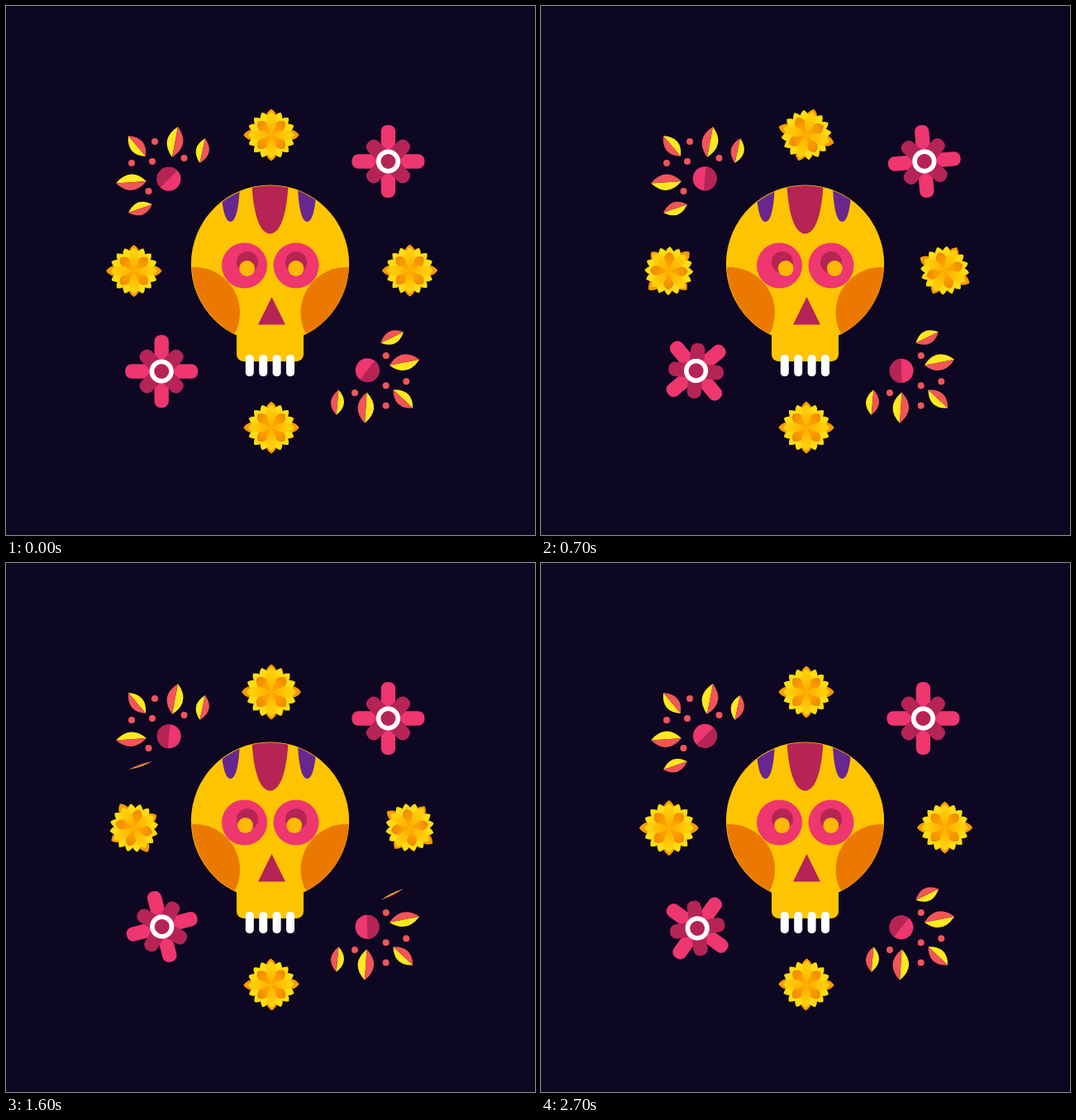
These frames come from a looping animation (640x640 px, 2800 ms). An HTML page:

```html
<!DOCTYPE html>
<html lang="en">
<head>
<meta charset="utf-8">
<title>Skull and flowers</title>
<style>
html, body { margin: 0; height: 100%; overflow: hidden; background: #0e0722; }
svg { display: block; width: 100vw; height: 100vh; }
</style>
</head>
<body>
<svg viewBox="0 0 640 640">
  <defs>
    <clipPath id="headClip"><circle cx="319.7" cy="312.2" r="95"/></clipPath>
    <radialGradient id="gold" gradientUnits="userSpaceOnUse" cx="0" cy="0" r="27">
      <stop offset=".2" stop-color="#ffb400"/><stop offset="1" stop-color="#ffd60e"/>
    </radialGradient>
    <radialGradient id="amber" gradientUnits="userSpaceOnUse" cx="0" cy="0" r="23">
      <stop offset=".3" stop-color="#fba400"/><stop offset="1" stop-color="#f08800"/>
    </radialGradient>
  </defs>
  <g id="garden"></g>
  <g id="skull">
    <circle cx="319.5" cy="312" r="95.6" fill="#ffc400"/>
    <rect x="279" y="370" width="81" height="60" rx="8.5" fill="#ffc400"/>
    <g clip-path="url(#headClip)">
      <g fill="#eb7900"><circle cx="228" cy="371" r="55"/><circle cx="411.5" cy="371" r="55"/></g>
      <path fill="#b52454" d="M297 205C298 248 306 275.5 319.5 275.5S341 248 342 205z"/>
      <g fill="#67278f">
        <path id="streak" d="M260 215C261 245 265 261 271.5 261S282 245 283 215z"/>
        <use href="#streak" transform="matrix(-1 0 0 1 635.8 0)"/>
      </g>
    </g>
    <g fill="#ee366f"><circle cx="288.5" cy="314" r="27.5"/><circle cx="351" cy="314" r="27.5"/></g>
    <g fill="#b52454">
      <circle cx="292" cy="310" r="13"/><circle cx="351" cy="310" r="13"/>
      <path d="M321.5 352L338 385.5H305z"/>
    </g>
    <g id="pupils" fill="#ffb900"><circle cy="317.5" r="9.4"/><circle cx="59.2" cy="317.5" r="9.4"/></g>
    <g id="teeth" fill="#fff"></g>
  </g>
</svg>
<script>
const LOOP = 2800;
const $ = id => document.getElementById(id);

function add(parent, tag, attrs = {}) {
  const node = document.createElementNS('http://www.w3.org/2000/svg', tag);
  for (const key in attrs) node.setAttribute(key, attrs[key]);
  return parent.appendChild(node);
}

// Progress from 0 to 1 between two times: steady, soft, or snappy
const linear = (t, start, end) => Math.min(1, Math.max(0, (t - start) / (end - start)));
const soft = (t, start, end) => (1 - Math.cos(Math.PI * linear(t, start, end))) / 2;
function snappy(t, start, end) {
  const u = linear(t, start, end);
  return u < .5 ? 4 * u ** 3 : 1 - 4 * (1 - u) ** 3;
}
const swell = (t, start) => 1 + .16 * (soft(t, start, start + 500) - soft(t, start + 500, start + 1500));

const parts = [];
const animate = (node, transform) => parts.push(t => node.setAttribute('transform', transform(t)));

// Flowers with rounded pink petals
function pinkFlower(x, y, dx, dy, start, end) {
  const flower = add($('garden'), 'g');
  const petals = (length, turn, fill) => {
    for (let i = 0; i < 4; i++)
      add(flower, 'rect', { x: -8.7, y: -length, width: 17.4, height: length, rx: 7.8, fill, transform: `rotate(${turn + i * 90})` });
  };
  petals(44, 0, '#ee366f');
  petals(33.5, 45, '#b52454');
  add(flower, 'circle', { r: 14.6, fill: '#fff' });
  add(flower, 'circle', { r: 9, fill: '#b52454' });
  animate(flower, t => `translate(${x} ${y}) rotate(${360 * linear(t, start, end)}) translate(${dx} ${dy})`);
}

// Layered golden flowers
function marigold(x, y, angle, scale = () => 1) {
  const flower = add($('garden'), 'g');
  const petal = (turn, length, width, fill) => add(flower, 'path', {
    d: `M0 0C${length * .5} ${-width} ${length * .82} ${-width} ${length} 0C${length * .82} ${width} ${length * .5} ${width} 0 0`,
    fill, transform: `rotate(${turn})`
  });
  for (let i = 0; i < 4; i++) petal(i * 90, i % 2 ? 31.5 : 33.7, 9, '#f79a00');
  for (let i = 0; i < 16; i++) if (i % 4) petal(i * 22.5, 29.5, 7.5, '#ffdc12');
  for (let i = 0; i < 4; i++) petal(i * 90 + 45, 23, 8.5, 'url(#amber)');
  for (let i = 0; i < 4; i++) petal(i * 90, 28, 8, 'url(#gold)');
  animate(flower, t => `translate(${x} ${y}) rotate(${angle(t)}) scale(${scale(t)})`);
}

// Sprays of two-toned leaves, dots and a turning disc
function spray(transform) {
  const group = add($('garden'), 'g', { transform });
  const leaves = [
    [234.5, 190, 241, 160], [133, 214.5, 170, 212], [177, 240, 148, 250],
    [169, 182, 148, 157], [201, 183, 208, 146]
  ];
  leaves.forEach(([x0, y0, x1, y1], i) => {
    const half = Math.hypot(x1 - x0, y1 - y0) / 2;
    const width = half * .52;
    // The lowest leaf is lit from its other side
    const lit = i === 2 ? 1 : -1;
    const turn = Math.atan2(y1 - y0, x1 - x0) * 180 / Math.PI;
    const node = add(group, 'g');
    for (const [side, fill] of [[lit, '#ffe81f'], [-lit, '#f25558']])
      add(node, 'path', { d: `M${-half} 0Q0 ${-side * lit * lit * -width * 2} ${half} 0z`, fill });
    const start = 60 + i * 80;
    const flip = t => soft(t, start, start + 280) - soft(t, start + 1250, start + 1530);
    animate(node, t => `translate(${(x0 + x1) / 2} ${(y0 + y1) / 2}) rotate(${turn}) scale(1 ${Math.cos(Math.PI * flip(t))})`);
  });
  for (const [cx, cy] of [[180, 164], [152, 190], [177, 188], [215.5, 184], [172.5, 224]])
    add(group, 'circle', { cx, cy, r: 4, fill: '#f25558' });
  const disc = add(group, 'g');
  add(disc, 'circle', { r: 14.5, fill: '#ee366f' });
  add(disc, 'path', { d: 'M10.25-10.25A14.5 14.5 0 0 0-10.25 10.25z', fill: '#b52454' });
  animate(disc, t => `translate(197.7 209.2) rotate(${t * .2}) translate(-.7 0)`);
}

spray('');
spray('translate(436.6 440.8) rotate(173) translate(-197.7 -209.2)');

pinkFlower(463.1, 188, -.7, 0, 100, 1335);
pinkFlower(188.6, 441, -.4, 1, 310, 3122);

marigold(321, 156, t => -180 * snappy(t, 200, 900), t => swell(t, 550));
marigold(488.5, 320, t => -180 * (snappy(t, 250, 930) + snappy(t, 1030, 1930)));
marigold(154.8, 320.5, t => -180 * linear(t, 200, 2300), t => swell(t, 1650));
marigold(321, 510, t => -90 * (snappy(t, 1500, 2150) + snappy(t, 2150, 2800)));

for (let i = 0; i < 4; i++)
  add($('teeth'), 'rect', { x: 289.8 + i * 16.4, y: 422, width: 10, height: 26, rx: 4.6 });

const gaze = t => 291.6 + 6.7 * soft(t, 300, 950) - 10.6 * soft(t, 950, 1850) + 3.9 * soft(t, 1900, 2700);
animate($('pupils'), t => `translate(${gaze(t)} 0)`);

function draw() {
  const t = performance.now() % LOOP;
  parts.forEach(update => update(t));
  requestAnimationFrame(draw);
}
draw();
</script>
</body>
</html>
```
